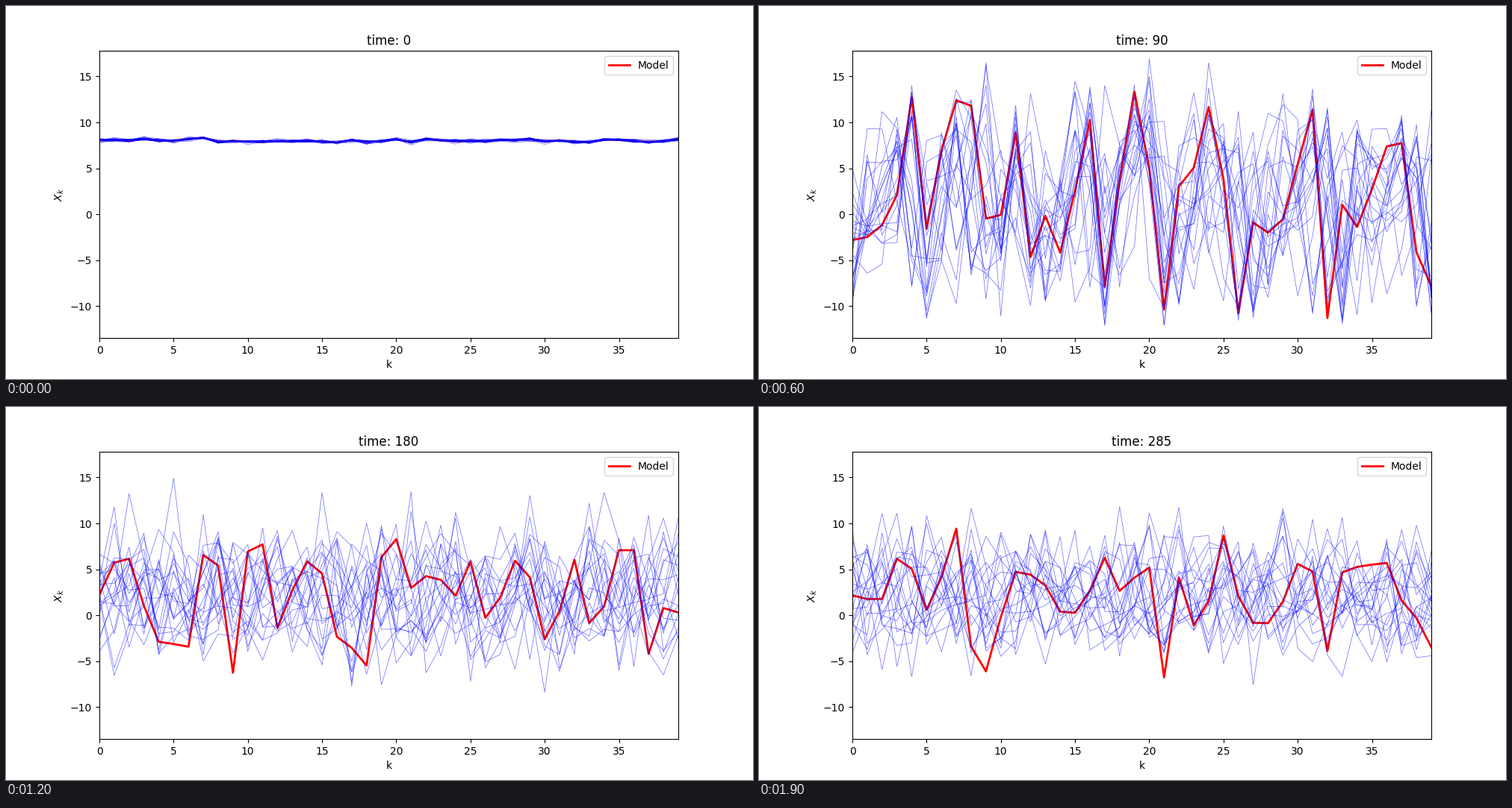
Animation of 1000x500 px, one loop 2 s. Source, as a matplotlib script:

```python
import numpy as np
import matplotlib.pyplot as plt
from matplotlib.animation import FuncAnimation

SITES, FORCE, DT = 40, 8.0, 0.01
FRAMES, STRIDE = 20, 15
MEMBERS, SPREAD = 20, 0.1

# Small bumps on the steady state, in hundredths, one per site; the rest is computed.
BUMPS = [10, 10, 0, 20, 3, 3, 20, 33, -11, 0, -8, -10, -3, -5, 0, -10, -17, 8, -12, -5,
         18, -15, 20, 5, -5, 0, -5, 10, 5, 20, -5, 5, -10, -15, 13, 10, 0, -12, -5, 20]


def slope(x):
    """Lorenz-96 tendency on a ring of sites."""
    ahead, back, back2 = (np.roll(x, s, axis=-1) for s in (-1, 1, 2))
    return (ahead - back2) * back - x + FORCE


def step(x):
    """One fourth-order Runge-Kutta step."""
    a = slope(x)
    b = slope(x + DT / 2 * a)
    c = slope(x + DT / 2 * b)
    d = slope(x + DT * c)
    return x + DT / 6 * (a + 2 * b + 2 * c + d)


def history(x):
    """States at every frame, starting from x."""
    states = [x]
    for _ in range(FRAMES - 1):
        for _ in range(STRIDE):
            x = step(x)
        states.append(x)
    return states


rng = np.random.default_rng(4)
start = FORCE + np.array(BUMPS) / 100
model = history(start)
ensemble = history(start + SPREAD * rng.standard_normal((MEMBERS, SITES)))

plt.rcParams["font.family"] = "DejaVu Sans"
fig, ax = plt.subplots(figsize=(10, 5), dpi=100)
sites = np.arange(SITES)
model_line, = ax.plot(sites, model[0], color="red", lw=2, label="Model")
member_lines = ax.plot(sites, ensemble[0].T, color="blue", lw=0.5, alpha=0.6)
ax.set_xlim(0, SITES - 1)
ax.set_ylim(-13.45, 17.8)
ax.set_xlabel("k")
ax.set_ylabel("$X_k$")
ax.legend(loc="upper right")
title = ax.set_title("time: 0")


def draw(frame):
    model_line.set_ydata(model[frame])
    for line, row in zip(member_lines, ensemble[frame]):
        line.set_ydata(row)
    title.set_text(f"time: {frame * STRIDE}")
    return [model_line, title, *member_lines]


anim = FuncAnimation(fig, draw, frames=FRAMES, interval=100, repeat=True, blit=False)
plt.show()
```
